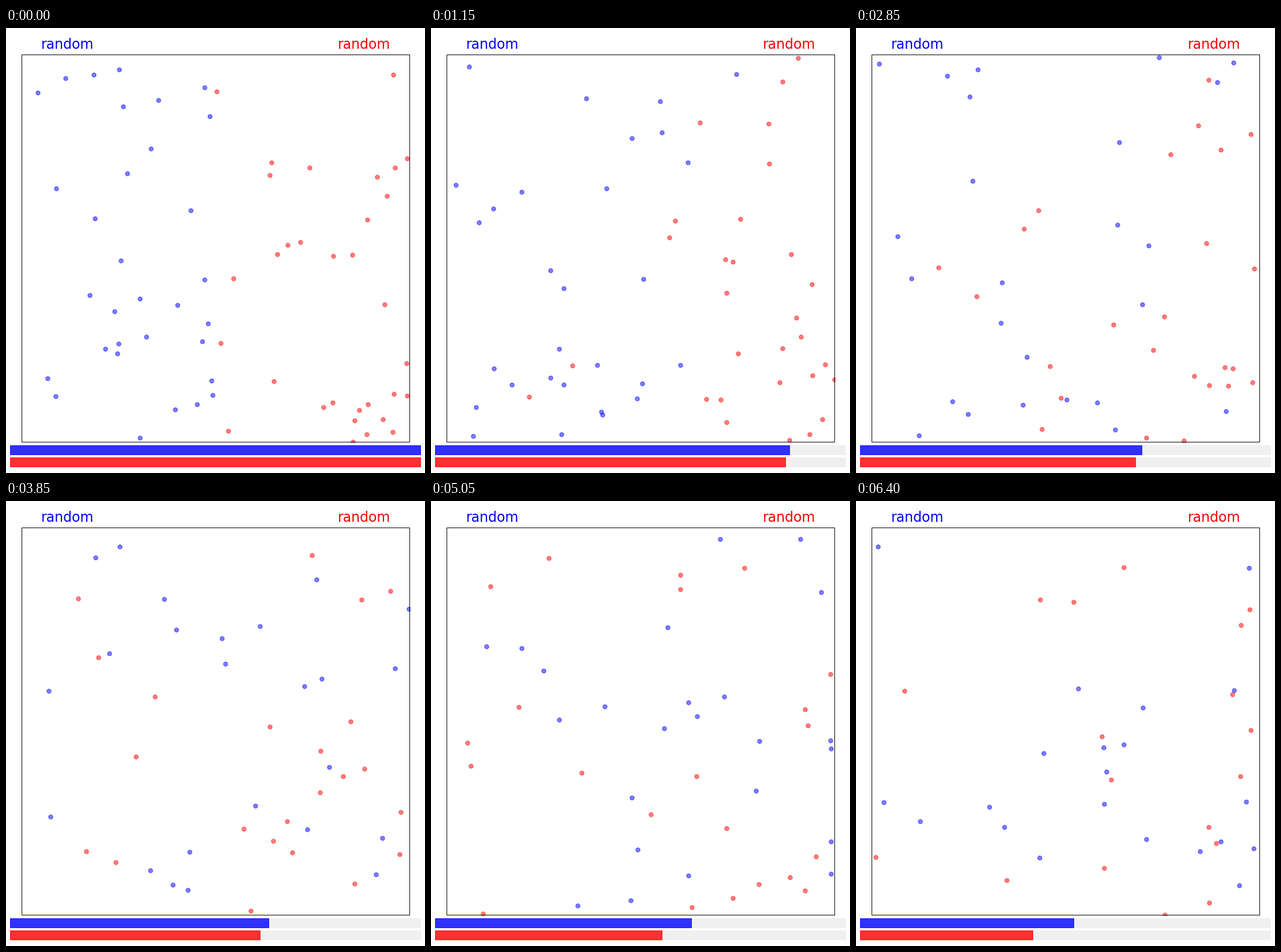
These frames come from a looping animation (726x771 px, 6.45 s). A matplotlib script:

```python
import matplotlib.pyplot as plt
import numpy as np
from matplotlib.animation import FuncAnimation
from matplotlib.patches import Rectangle

W, H, DPI = 726, 771, 100
FRAMES, STEP = 129, 50
LEFT, TOP, RIGHT, BOTTOM = 27.5, 46.5, 699.5, 717.5
MIDDLE, INSET = (LEFT + RIGHT) / 2, 0.05 * (RIGHT - LEFT)
BAR_X, BAR_W, BAR_H = 7, 712, 17
SIZE = 32
KEYS = [0, 23, 36, 57, 77, 101, 128]
PX = 72 / DPI

plt.rcParams["font.family"] = "DejaVu Sans"


def simulate(x0, x1, seed):
    """Dots wander under light gravity and bounce off the walls."""
    rng = np.random.default_rng(seed)
    low, high = np.array([LEFT, TOP]), np.array([RIGHT, BOTTOM])
    x = rng.uniform(x0, x1, SIZE)
    y = BOTTOM - (BOTTOM - TOP) * rng.random(SIZE) ** 1.4
    pos = np.column_stack([x, y])
    vel = rng.normal(0, 7, pos.shape)
    path = [pos]
    for _ in range(FRAMES - 1):
        vel = 0.97 * vel + rng.normal(0, 1.7, vel.shape) + [0, 0.07]
        pos = pos + vel
        hit = (pos < low) | (pos > high)
        vel = np.where(hit, -0.9 * vel, vel)
        pos = np.where(pos < low, 2 * low - pos, pos)
        pos = np.where(pos > high, 2 * high - pos, pos)
        path.append(pos)
    return path


class Team:
    def __init__(self, color, x0, x1, seed, label_x, align, bar_y, health):
        self.path = simulate(x0, x1, seed)
        self.width = np.rint(np.interp(np.arange(FRAMES), KEYS, health))
        # The team thins out more slowly than its total health falls
        self.alive = np.rint(SIZE * (self.width / BAR_W) ** 0.65).astype(int)

        ax.text(label_x, 35.5, "random", color=color, size=17, ha=align)
        ax.add_patch(Rectangle((BAR_X, bar_y), BAR_W, BAR_H, fc="#f0f0f0", lw=0))
        self.bar = ax.add_patch(Rectangle(
            (BAR_X + 0.5, bar_y + 0.5), BAR_W - 1, BAR_H - 1,
            color=color, alpha=0.8, lw=PX, snap=False))
        self.dots, = ax.plot([], [], "o", color=color, alpha=0.5,
                             ms=7.2 * PX, mew=1.3 * PX)
        self.dots.set_clip_path(arena)

    def show(self, i):
        self.dots.set_data(*self.path[i][:self.alive[i]].T)
        self.bar.set_width(self.width[i] - 1)
        return self.dots, self.bar


fig = plt.figure(figsize=(W / DPI, H / DPI), dpi=DPI, facecolor="white")
ax = fig.add_axes([0, 0, 1, 1])
ax.set(xlim=(0, W), ylim=(H, 0))
ax.axis("off")
arena = ax.add_patch(Rectangle((LEFT, TOP), RIGHT - LEFT, BOTTOM - TOP, fill=False,
                               ec="black", lw=PX, snap=False, zorder=3))

teams = [
    Team("blue", LEFT, MIDDLE, 4, LEFT + INSET, "left", 723,
         [712, 615, 520, 489, 449, 445, 371]),
    Team("red", MIDDLE, RIGHT, 9, RIGHT - INSET, "right", 744,
         [712, 608, 508, 478, 434, 394, 300]),
]


def update(i):
    return [artist for team in teams for artist in team.show(i)]


anim = FuncAnimation(fig, update, frames=FRAMES, interval=STEP,
                     repeat=True, repeat_delay=0)
plt.show()
```
